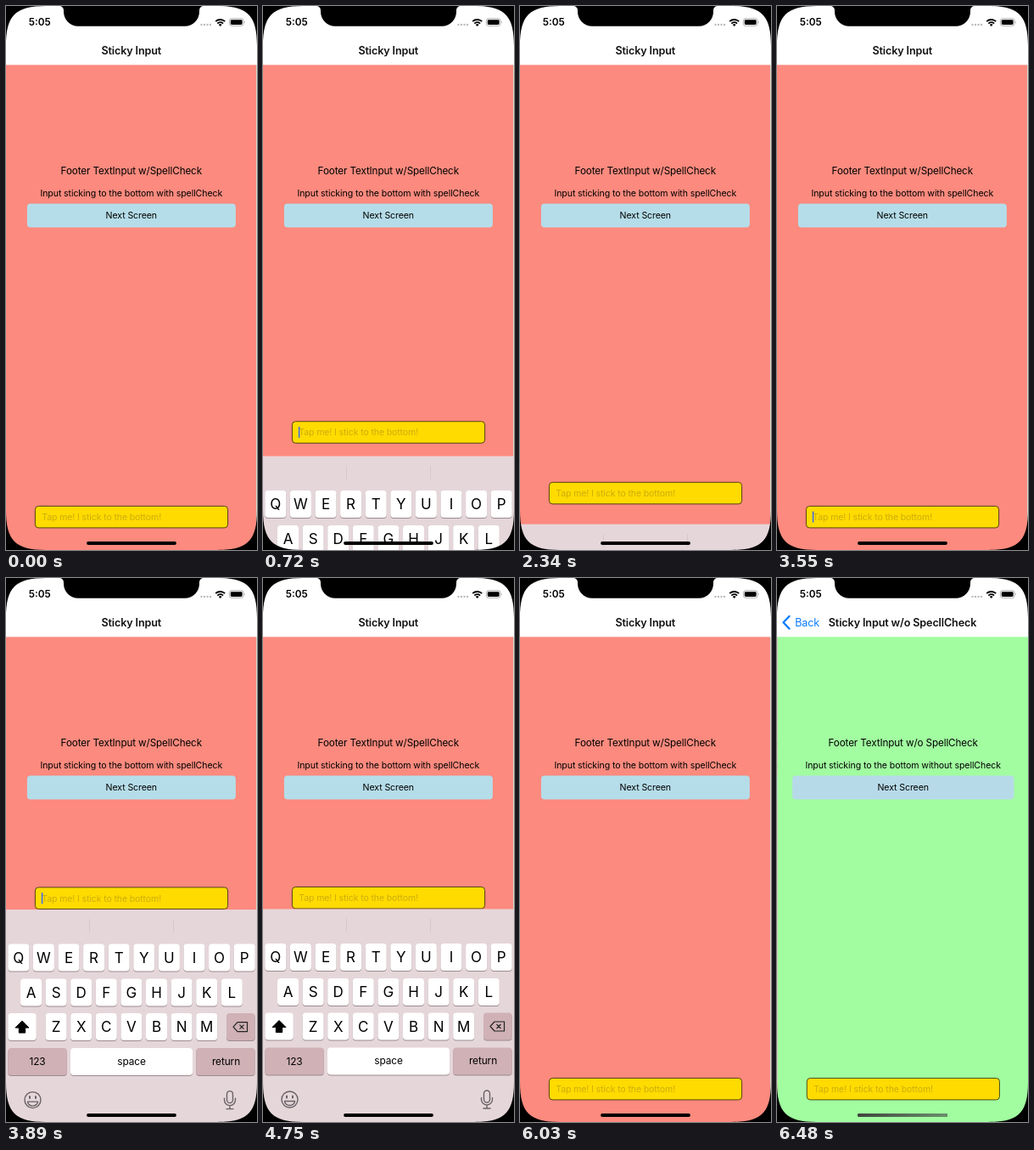
These frames come from a looping animation (296x640 px, 8 s). An HTML page:

```html
<!DOCTYPE html>
<html lang="en">
<head>
<meta charset="utf-8">
<title>Sticky Input</title>
<style>
  html, body { margin: 0; width: 100%; height: 100%; overflow: hidden; background: #000; }
  svg { display: block; width: 296px; height: 640px; }
  text { font-family: Inter, Roboto, sans-serif; letter-spacing: -.01em; text-anchor: middle; }
  .heading { font-size: 11.7px; }
  .body { font-size: 10.6px; }
  .nav { font-size: 12.6px; font-weight: 600; fill: #111; }
  .back { font-size: 12.6px; fill: #0a7cff; }
  .clock { font-size: 11.8px; font-weight: 600; letter-spacing: 0; }
  .letter { font-size: 17px; letter-spacing: 0; }
  .label { font-size: 11.9px; }
  .hint { font-size: 10.5px; fill: #cdac0c; text-anchor: start; }
  .icon { fill: none; stroke: #6a6266; stroke-width: 1.4; stroke-linecap: round; }
</style>
</head>
<body>
<svg id="stage" viewBox="0 0 296 640"></svg>
<script>
const LOOP = 8000, HOLD = 6480;
const stage = document.getElementById('stage');

const text = (cls, x, y, str, extra = '') =>
  `<text class="${cls}" x="${x}" y="${y}" ${extra}>${str}</text>`;
const box = (x, y, w, h, r, fill, extra = '') =>
  `<rect x="${x}" y="${y}" width="${w}" height="${h}" rx="${r}" fill="${fill}" ${extra}/>`;
const key = (x, y, w, fill = '#fff') =>
  box(x, y + 1, w, 32, 4, '#9b8b90') + box(x, y, w, 32, 4, fill);

const input = (id) => `<g id="${id}">
  ${box(34.4, 0, 227.2, 25.5, 4, '#ffdb00', 'stroke="#2b2408" stroke-width=".8"')}
  ${text('hint', 42.3, 16.7, 'Tap me! I stick to the bottom!')}</g>`;

const screen = (id, bg, button, width, suffix, sub) => `<g id="${id}">
  ${box(0, 69, 295.3, 571, 0, bg)}
  ${text('heading', 147.8, 198.4, 'Footer TextInput w/' + suffix)}
  ${text('body', 147.8, 223.7, `Input sticking to the bottom ${sub} spellCheck`)}
  ${box(147.9 - width / 2, 232.5, width, 28, 4, button)}
  ${text('body', 147.8, 250.3, 'Next Screen')}
  ${input(id + 'Input')}</g>`;

const row = (letters, x, y) => [...letters].map((c, i) =>
  key(x + i * 29.6, y, 25) + text('letter', x + 12.5 + i * 29.6, y + 22.3, c)).join('');

const keyboard = `<g id="keyboard">
  ${box(0, 385, 296, 256, 0, '#e5d6da')}
  <path d="M98.5 396v16M197.5 396v16" stroke="#d8c8cc"/>
  ${row('QWERTYUIOP', 2.3, 425.5)}${row('ASDFGHJKL', 17, 466.5)}${row('ZXCVBNM', 46.6, 507)}
  ${key(2.3, 507, 33.5)}
  <path d="M19 516l8 8h-4.3v6h-7.4v-6H11z" stroke="#000" stroke-linejoin="round"/>
  ${key(260, 507, 33.7, '#cfb1b6')}
  <path d="M268 523l5-5.5h11.5v11H273zM275.5 520.5l5 5m0-5l-5 5" fill="none" stroke="#222" stroke-width="1.2" stroke-linejoin="round"/>
  ${key(2.3, 548, 69.5, '#cfb1b6')}${text('label', 37, 568.3, '123')}
  ${key(76, 548, 144)}${text('label', 148, 567.5, 'space')}
  ${key(224.2, 548, 69.5, '#cfb1b6')}${text('label', 259.5, 567.5, 'return')}
  <g class="icon">
    <circle cx="31.5" cy="609" r="9.5"/>
    <path d="M28 605v2m7-2v2" stroke-width="2"/>
    <path d="M25.5 611h12a6 5 0 0 1-12 0z"/>
    <rect x="260.5" y="598.5" width="7" height="14" rx="3.5"/>
    <path d="M257.5 607v2a6.5 6.5 0 0 0 13 0v-2M264 615.5v4m-4 0h8"/>
  </g></g>`;

const statusBar = `${text('clock', 39.8, 23.4, '5:05')}
  <g fill="#bbb">${[230.5, 234, 237.5, 241].map(x => `<circle cx="${x}" cy="22" r="1.2"/>`).join('')}</g>
  <path d="M247.2 18.2a8 8 0 0 1 11 0M249.3 20.6a5 5 0 0 1 6.8 0" fill="none" stroke="#000" stroke-width="1.8"/>
  <path d="M250.8 22a2.7 2.7 0 0 1 3.8 0l-1.9 2z"/>
  ${box(263.4, 14.8, 16.6, 8.5, 2.5, 'none', 'stroke="#999" stroke-width=".8"')}
  ${box(264.8, 16.2, 13.8, 5.7, 1.3, '#000')}
  <path d="M281 17.6q1.4 1.5 0 3z" fill="#999"/>`;

// One continuous-curvature screen corner, mirrored into place.
const corner = (x, y, sx, sy) =>
  `<path d="M0 0V47C0 11 11 0 47 0z" transform="translate(${x} ${y}) scale(${sx} ${sy})"/>`;
const bezel = corner(0, 0, 1, 1) + corner(296, 0, -1, 1) + corner(0, 640, 1, -1) + corner(296, 640, -1, -1) +
  '<path d="M63 0a5 5 0 0 1 5 5v1.700a17 17 0 0 0 17 17H211a17 17 0 0 0 17-17V5a5 5 0 0 1 5-5z"/>';

stage.innerHTML = `<defs><linearGradient id="fade">
    <stop stop-color="#3f443f"/><stop offset="1" stop-color="#6a8f6a"/></linearGradient></defs>
  ${box(0, 0, 296, 640, 0, '#fff')}
  ${screen('red', '#fc8a7e', '#b5dde9', 246, 'SpellCheck', 'with')}
  ${box(0, 69, 295.3, 571, 0, '#000', 'id="shade"')}
  ${screen('green', '#a1fda0', '#b7dae9', 261.3, 'o SpellCheck', 'without')}
  ${keyboard}
  ${box(0, 0, 296, 69.3, 0, '#fff')}
  ${text('nav', 147.8, 56.8, 'Sticky Input', 'id="oldTitle"')}
  ${text('nav', 147.6, 56.8, 'Sticky Input w/o SpecllCheck', 'id="newTitle"')}
  ${text('back', 35.3, 56.8, 'Back', 'id="back"')}
  <path id="chevron" d="M14.5 45l-7 7.3 7 7.3" fill="none" stroke="#0a7cff" stroke-width="2.3" stroke-linecap="round" stroke-linejoin="round"/>
  ${statusBar}${bezel}
  ${box(95.1, 630, 105.8, 3.9, 1.9, '#000')}
  ${box(95.1, 630, 105.8, 3.9, 1.9, 'url(#fade)', 'id="homeTint"')}`;

const el = {};
stage.querySelectorAll('[id]').forEach(node => el[node.id] = node);
el.redInput.insertAdjacentHTML('beforeend', box(41.8, 6, 1.6, 13.5, .8, '#3f6fe8', 'id="caret"'));
el.green.insertAdjacentHTML('afterbegin', box(-1, 69, 1, 571, 0, '#d3dccb'));
el.caret = document.getElementById('caret');

const move = (node, x, y) => node.setAttribute('transform', `translate(${x} ${y})`);
const fade = (node, opacity) => node.setAttribute('opacity', opacity);
const ramp = (t, from, to) => Math.min(1, Math.max(0, (t - from) / (to - from)));

// Critically damped spring, t in ms.
const spring = (t) => {
  const x = Math.max(0, t) * .01826;
  return 1 - Math.exp(-x) * (1 + x);
};

const caretOpacity = (t, shown, hidden) =>
  t < shown || t >= hidden ? 0
    : 1 - ramp(t - shown, 540, 680) + ramp(t - shown, 840, 980);

function draw(time) {
  const t = Math.min(time % LOOP, HOLD);

  const raised = spring(t - 640) - spring(t - 2142) + spring(t - 3571) - spring(t - 4740);
  move(el.keyboard, 0, 256 * (1 - raised));
  move(el.redInput, 0, 588.4 - 229 * raised);
  move(el.greenInput, 0, 588.4);
  fade(el.caret, caretOpacity(t, 620, 2110) + caretOpacity(t, 3545, 4740));

  const pushed = spring(t - 6040);
  move(el.red, -89 * pushed, 0);
  move(el.green, 296 * (1 - pushed), 0);
  fade(el.shade, .1 * pushed);
  move(el.oldTitle, -113 * pushed, 0);
  fade(el.oldTitle, 1 - ramp(pushed, 0, .7));
  move(el.newTitle, 148 * (1 - pushed), 0);
  fade(el.newTitle, ramp(pushed, .2, .95));
  move(el.back, 113 * (1 - pushed), 0);
  fade(el.back, ramp(pushed, .3, .95));
  fade(el.chevron, ramp(pushed, .3, .95));
  fade(el.homeTint, ramp(pushed, .5, .99));
}

const start = performance.now();
(function tick() {
  draw(performance.now() - start);
  requestAnimationFrame(tick);
})();
</script>
</body>
</html>
```
